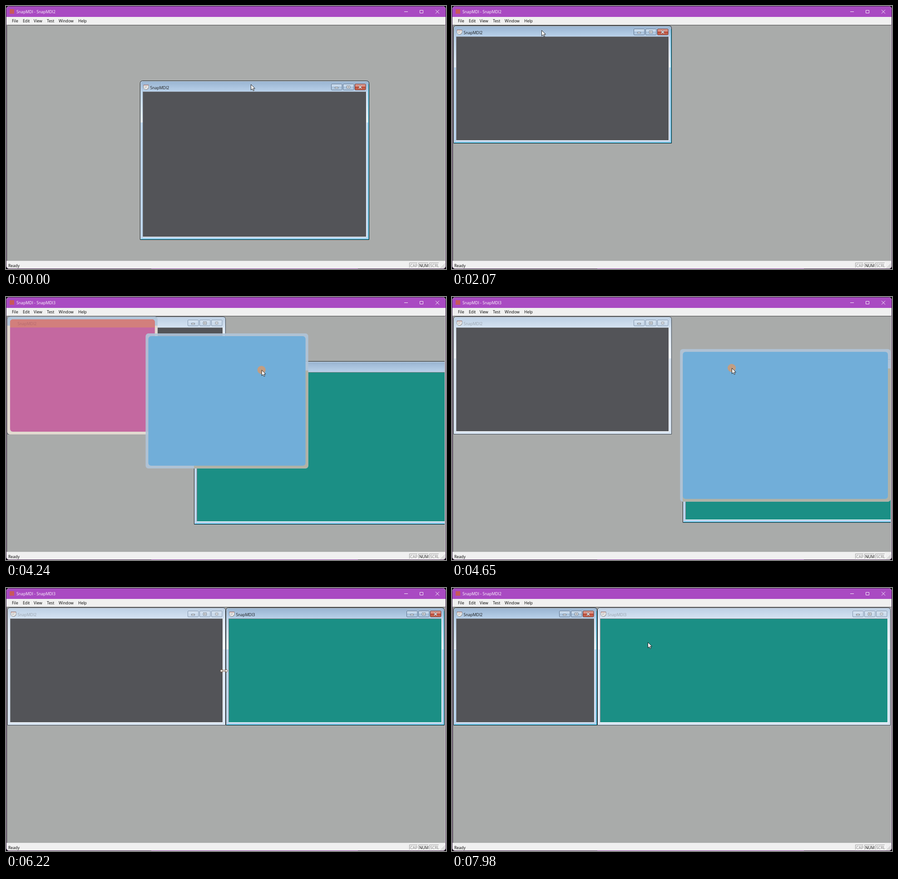
These frames come from a looping animation (969x578 px, 8 s). An HTML page:

```html
<!DOCTYPE html>
<html lang="en">
<head>
<meta charset="utf-8">
<title>Snapping windows</title>
<style>
html, body { margin: 0; width: 100%; height: 100%; overflow: hidden; background: #000; }
svg { display: block; width: 969px; height: 578px; }
text { font: 8.7px "Open Sans", "Noto Sans", sans-serif; white-space: pre; }
</style>
</head>
<body>
<svg id="stage" viewBox="0 0 969 578">
  <defs>
    <linearGradient id="titleOn" x2="0" y2="1"><stop stop-color="#98b3d0"/><stop offset="1" stop-color="#b9d1ea"/></linearGradient>
    <linearGradient id="titleOff" x2="0" y2="1"><stop stop-color="#bccfe4"/><stop offset="1" stop-color="#d5e3f2"/></linearGradient>
    <linearGradient id="shine" x2="0" y2="1"><stop stop-color="#fff" stop-opacity="0"/><stop offset="1" stop-color="#fff" stop-opacity=".65"/></linearGradient>
    <linearGradient id="btnOn" x2="0" y2="1"><stop stop-color="#d3e2f2"/><stop offset=".5" stop-color="#b9cee4"/><stop offset=".5" stop-color="#a3bdd8"/><stop offset="1" stop-color="#bdd3ea"/></linearGradient>
    <linearGradient id="btnOff" x2="0" y2="1"><stop stop-color="#d6e3f1"/><stop offset="1" stop-color="#c5d6e9"/></linearGradient>
    <linearGradient id="btnClose" x2="0" y2="1"><stop stop-color="#e3ada2"/><stop offset=".5" stop-color="#cf7364"/><stop offset=".5" stop-color="#b6402c"/><stop offset="1" stop-color="#cf7a66"/></linearGradient>
    <clipPath id="client"><rect x="3" y="43" width="963" height="517"/></clipPath>
    <g id="doc">
      <path d="M.5 1.5h11v7l-3 3h-5l-3-3z" fill="#f8f8f8" stroke="#6d6a6a" stroke-width=".8"/>
      <path d="M1 2h10" stroke="#b0483f" stroke-dasharray="2 1"/>
      <path d="M2.5 4.5h7M2.5 6.5h6M2.5 8.5h4M8.5 11.500v-3h3" fill="none" stroke="#8c8c8c" stroke-width=".7"/>
    </g>
    <path id="arrow" d="M.5.5v12.200l2.900-2.700 2 4.300 2-.9-2-4.200h3.900z" fill="#fff" stroke="#111" stroke-width=".9"/>
    <path id="resize" d="M-8.500 0l4-4v2.700h9v-2.700l4 4-4 4v-2.700h-9v2.700z" fill="#fff" stroke="#5d3a22" stroke-width=".9"/>
  </defs>

  <rect width="969" height="578" fill="#050208"/>
  <rect x=".5" y=".5" width="968" height="577" rx="6" fill="#f0f0f0" stroke="#43204d"/>
  <path d="M1 24V7a6 6 0 0 1 6-6h955a6 6 0 0 1 6 6v17z" fill="#a94ac2"/>
  <path d="M320 577.500h455" stroke="#8a3c9f"/>
  <rect x="8" y="7" width="10" height="10" fill="#c8585a"/>
  <text id="caption" x="23" y="16" fill="#fff"></text>
  <path d="M877 12.500h8M911.500 9.500h7v6h-7zM946 8.500l8 8m0-8l-8 8" fill="none" stroke="#fff" stroke-width=".9"/>
  <g id="menu"></g>
  <rect x="1" y="41" width="967" height="520" fill="#a0a0a0"/>
  <path d="M2.500 560V42.500H967" fill="none" stroke="#696969"/>
  <path d="M1 560.500h966.500V42" fill="none" stroke="#e8e8e8"/>
  <rect x="3" y="43" width="963" height="517" fill="#a9abaa"/>
  <text x="5" y="573.500">Ready</text>
  <g id="status"></g>
  <path d="M960 576l7-7M963 576l4-4M957 576l10-10" stroke="#b5b5b5"/>
  <g id="scene" clip-path="url(#client)"></g>
  <g id="pointer"></g>
</svg>
<script>
const LOOP = 8000, LEFT = 3, TOP = 43, RIGHT = 966, BOTTOM = 560;
const el = id => document.getElementById(id);
const clamp = v => Math.max(0, Math.min(1, v));
const mix = (a, b, p) => a + (b - a) * p;
const mixRect = (a, b, p) => a.map((v, i) => mix(v, b[i], p));
const smooth = u => u * u * (3 - 2 * u);

// start, end, x, y reached, bow of the path in y
const START = [539, 172];
const MOVES = [
  [100, 210, 533, 179], [410, 990, 205, 49], [990, 1120, 205, 43],
  [1410, 1750, 184, 35], [1910, 2070, 197, 53], [2420, 2820, 155, 109],
  [3020, 3160, 151, 102], [3320, 3830, 430, 155], [4060, 4340, 616, 156, 5],
  [5730, 6220, 480, 182], [6640, 7280, 342, 182], [7320, 7470, 316, 182],
  [7620, 7980, 431, 119]
];
const PRESSES = [[410, 1410], [3320, 5330], [6480, 7620]];

function cursorAt(t) {
  let [x, y] = START;
  for (const [from, to, nx, ny, bow = 0] of MOVES) {
    if (t <= from) break;
    const u = clamp((t - from) / (to - from)), p = smooth(u);
    x = mix(x, nx, p);
    y = mix(y, ny, p) + bow * Math.sin(Math.PI * u);
  }
  return [x, y];
}

const HALF = [3, 43, 481, 259];
const QUARTER = [484, 43, 482, 259];
const SPLIT_LEFT = [3, 43, 240, 259];
const SPLIT_RIGHT = [243, 43, 241, 259];

const edgeAt = t => t < 6640 ? 484 : Math.round(cursorAt(t - 15)[0] + 4);

function firstRect(t) {
  if (t < 410) return [295, 164, 505, 350];
  if (t < 1470) {
    const [x, y] = cursorAt(Math.max(410, t - 17));
    return [x - 238, y - 15, 505, 350];
  }
  return [3, 43, (t < 7620 ? edgeAt(t) : 320) - 3, 259];
}

function secondRect(t) {
  if (t < 5390) {
    const [x, y] = t < 3320 ? [151, 102] : cursorAt(Math.max(3320, t - 42));
    return [x - 108, y - 19, 805, 359];
  }
  return t < 7680 ? QUARTER : [320, 43, 646, 259];
}

function clipRect([x, y, w, h]) {
  const l = Math.max(x, LEFT), t = Math.max(y, TOP);
  return [l, t, Math.min(x + w, RIGHT) - l, Math.min(y + h, BOTTOM) - t];
}

const box = (x, y, w, h, fill, more = "") =>
  `<rect x="${x}" y="${y}" width="${Math.max(0, w)}" height="${Math.max(0, h)}" fill="${fill}" ${more}/>`;
const line = (d, stroke, more = "") => `<path d="${d}" fill="none" stroke="${stroke}" ${more}/>`;

function button(x, y, kind, active) {
  const close = kind === "close";
  const fill = !active ? "btnOff" : close ? "btnClose" : "btnOn";
  const edge = active ? (close ? "#6d2b26" : "#60758f") : "#8496ad";
  const glyph = {
    min: "M8.500 7.500h7v2.500h-7z",
    max: "M8.500 4.500h7v5.500h-7zM10.800 6.700h2.400v1.200h-2.400z",
    close: "M9 4.500l6 5.500m0-5.500l-6 5.500"
  }[kind];
  const mark = close
    ? line(glyph, "#4b5563", 'stroke-width="2.6"') + line(glyph, "#fff", 'stroke-width="1.5"')
    : `<path d="${glyph}" fill="#fff" stroke="#4b5563" stroke-width=".8"/>`;
  return `<g transform="translate(${x} ${y})">` +
    box(.5, .5, 23.5, 13, `url(#${fill})`, `rx="1.500" stroke="${edge}"`) + mark + "</g>";
}

function child(rect, title, fill, active) {
  const [x, y, w, h] = rect.map(Math.round);
  const frame = active ? "#b9d3ee" : "#d9e5f2";
  const outline = `M.5 ${h - .5}V5.500a5 5 0 0 1 5-5H${w - 5.5}a5 5 0 0 1 5 5V${h - .5}z`;
  let s = `<g transform="translate(${x} ${y})"><path d="${outline}" fill="${frame}"/>`;
  s += `<path d="M1 24V6a5 5 0 0 1 5-5H${w - 6}a5 5 0 0 1 5 5V24z" fill="url(#title${active ? "On" : "Off"})"/>`;
  s += box(1, 24, w - 2, 68, "url(#shine)");
  s += line(`M1.500 ${h - 2}V6a4.500 4.500 0 0 1 4.500-4.500H${w - 6}`, "#fff", 'opacity=".6"');
  if (active) s += line(`M2 ${h - 1.5}H${w - 1.5}V8`, "#35c5e8", 'stroke-width="1.3"');
  s += line(outline, active ? "#0c1418" : "#39424c");
  s += box(6, 24, w - 12, h - 30, "#fff") + box(6, 24, w - 13, h - 31, "#7c8086");
  s += box(7, 25, w - 14, h - 32, fill);
  s += '<use href="#doc" x="7.500" y="8"/>';
  s += `<text x="22.500" y="18.500" fill="${active ? "#111" : "#98a2ad"}">${title}</text>`;
  ["min", "max", "close"].forEach((kind, i) => s += button(w - 84 + i * 26, 7, kind, active));
  return s + "</g>";
}

// translucent frame with a solid core; the frame turns warm over the window below
function preview([x, y, w, h], core, warm, under, id) {
  const [ux, uy, uw, uh] = under;
  return `<clipPath id="${id}">${box(ux, uy + 20, uw, uh - 20, "#000")}</clipPath>` +
    box(x, y, w, h, "#b1c5d9", 'rx="6" opacity=".9"') +
    `<g clip-path="url(#${id})">${box(x, y, w, h, warm, 'rx="6"')}</g>` +
    box(x + 6, y + 6, w - 12, h - 12, core, 'rx="6" opacity=".985"');
}

function bluePreview(t, a, b) {
  const show = (rect, warm, under) => preview(rect, "#70aeda", warm, under, "warmBlue");
  if (t >= 912 && t < 1410)
    return show(mixRect([3, 45, 492, 338], HALF, clamp((t - 920) / 130)), "#aaaaa9", a);
  if (t >= 3690 && t < 4192)
    return show(mixRect(clipRect(b), SPLIT_RIGHT, clamp((t - 3690) / 130)), "#b1b2a7", b);
  if (t >= 4192 && t < 4322)
    return show(mixRect(SPLIT_RIGHT, clipRect(b), (t - 4192) / 130), "#b1b2a7", b);
  if (t >= 4650 && t < 5330)
    return show(mixRect(clipRect(b), QUARTER, clamp((t - 4620) / 130)), "#b1b2a7", b);
  if (t >= 6655 && t < 7620) {
    const left = edgeAt(t) - 5;
    return show([left, 43, RIGHT - left, 259], "#e2dad5", b);
  }
  return "";
}

function pinkPreview(t) {
  if (t < 3690 || t >= 4322) return "";
  const p = t < 4192 ? clamp((t - 3690) / 130) : 1 - (t - 4192) / 130;
  const [x, y, w, h] = mixRect(HALF, SPLIT_LEFT, p);
  return preview([x, y, w, h], "#c467a0", "#e2dad0", HALF, "warmPink") +
    `<path d="M${x + 6} ${y + 24}v-12a6 6 0 0 1 6-6h${w - 24}a6 6 0 0 1 6 6v12z" fill="#d27f7c"/>` +
    `<text x="25.500" y="61.500" fill="#b3686f">SnapMDI2</text>`;
}

function draw(t) {
  const second = t >= 2390 && t < 6480;
  const a = firstRect(t), b = secondRect(t);
  el("caption").textContent = "SnapMDI - SnapMDI" + (second ? 3 : 2);
  el("scene").innerHTML = child(a, "SnapMDI2", "#535458", !second) +
    (t >= 2390 ? child(b, "SnapMDI3", "#1b8f85", second) : "") +
    pinkPreview(t) + bluePreview(t, a, b);

  const [x, y] = cursorAt(t);
  const down = PRESSES.some(([from, to]) => t >= from && t < to);
  const sizing = t > 5900 && t < 7660 && (x < 489 || t > 6220);
  el("pointer").innerHTML =
    (down ? `<circle cx="${x}" cy="${y}" r="9" fill="#e8965a" opacity=".68"/>` : "") +
    `<use href="#${sizing ? "resize" : "arrow"}" x="${x}" y="${y}"/>`;
}

const MENU = { File: 13, Edit: 37, View: 61, Test: 90, Window: 116, Help: 159 };
el("menu").innerHTML = Object.entries(MENU)
  .map(([name, x]) => `<text x="${x}" y="36">${name}</text>`).join("");

el("status").innerHTML = [["CAP", 888, 19], ["NUM", 908, 23], ["SCRL", 932, 22]]
  .map(([name, x, w]) => line(`M${x + .5} 575V564.500h${w - 1}`, "#a0a0a0") +
    line(`M${x} 575.500h${w - .5}V564`, "#fff") +
    `<text x="${x + 2}" y="573.500" fill="${name === "NUM" ? "#111" : "#858585"}">${name}</text>`).join("");

const begin = performance.now();
function tick() {
  draw((performance.now() - begin) % LOOP);
  requestAnimationFrame(tick);
}
tick();
</script>
</body>
</html>
```
